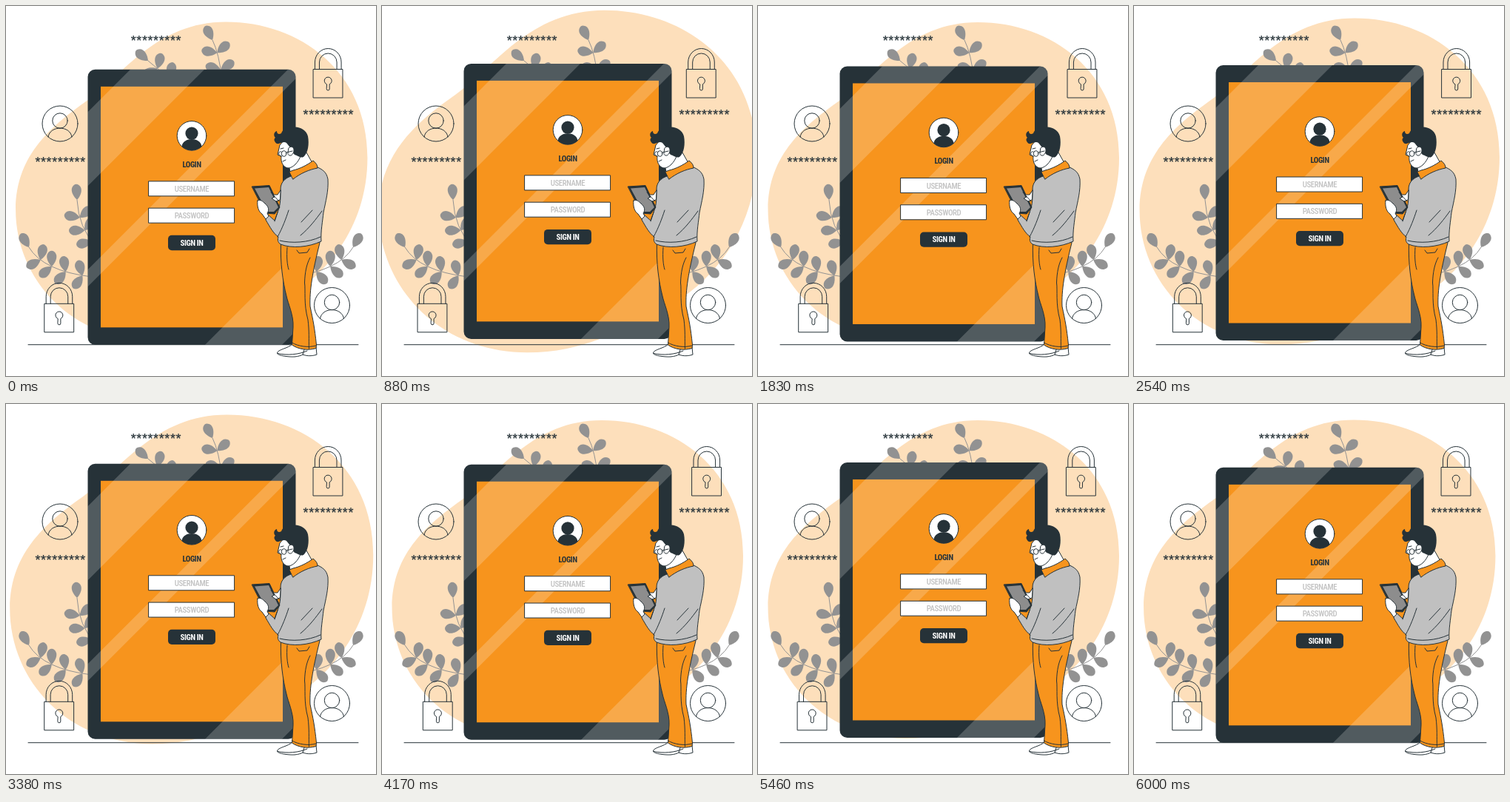
Recreate the animation shown at these times as an HTML page. Size 500 by 500 pixels, loop 6.04 s.

```html
<!DOCTYPE html>
<html lang="en">
<head>
<meta charset="utf-8">
<title>Sign in</title>
<style>
  html, body { margin: 0; width: 100%; height: 100%; overflow: hidden; background: #fff; }
  svg { display: block; width: 100%; height: 100%; }
  .line { fill: none; }
  .line, .ink { stroke: #263238; stroke-width: 1; stroke-linecap: round; stroke-linejoin: round; }
  .dark { fill: #263238; }
  .white { fill: #fff; }
  .orange { fill: #f7941d; }
  .grey { fill: #c0c0c0; }
  .plant path { fill: #929292; }
  .plant .stem { fill: none; stroke: #929292; stroke-width: 1; }
  .label { font: 500 10.8px "Roboto Condensed", Roboto, sans-serif; letter-spacing: -.4px; text-anchor: middle; }
  .strong { font-weight: 700; }
  .stars { font: 18px "Liberation Sans", Arial, sans-serif; letter-spacing: .6px; fill: #263238; stroke: #263238; stroke-width: .2; }
</style>
</head>
<body>
<svg viewBox="0 0 500 500" xmlns="http://www.w3.org/2000/svg">
  <defs>
    <clipPath id="shell"><rect x="110.5" y="86" width="281" height="372" rx="10"/></clipPath>
    <g id="lock" class="line">
      <rect x="415.5" y="85.5" width="39.5" height="38.5"/>
      <path d="M417.500 85.500V76a17.800 18.500 0 0 1 35.600 0V85.500M423.500 85.500V76a11.800 12 0 0 1 23.600 0V85.500"/>
      <path d="M433.2 105.7a5 5 0 1 1 4 0V112a2 2 0 0 1-4 0Z"/>
    </g>
    <g id="user" class="line">
      <circle r="24"/>
      <circle cy="-4" r="10.2"/>
      <path d="M-16 18C-14 2 14 2 16 18"/>
    </g>
    <g id="field"><rect class="ink white" x="193" y="237" width="115.6" height="20"/></g>
  </defs>

  <path id="blob" fill="#fddfbb" d="M297 22C397 22 488 89 488 205C488 300 430 368 370 398C318 424 270 452 200 452C90 452 13.5 370 13.5 275C13.5 200 65 160 110 128C158 94 203 22 297 22Z"/>
  <g id="plants" class="plant"></g>
  <g class="stars">
    <text x="168.7" y="53.4">*********</text>
    <text x="39.4" y="216.8">*********</text>
    <text x="401.6" y="153.4">*********</text>
  </g>
  <use href="#user" x="73" y="159"/>
  <use href="#user" x="440.5" y="404.5"/>
  <path class="line" d="M30 457.7H476"/>
  <use id="lockRight" href="#lock"/>
  <use id="lockLeft" href="#lock"/>

  <g id="device">
    <rect class="dark" x="110.5" y="86" width="281" height="372" rx="10"/>
    <rect class="orange" x="128" y="109" width="246" height="325.5"/>
    <g id="glare" clip-path="url(#shell)" fill="#fff" opacity=".2"></g>
    <circle class="ink white" cx="251" cy="175.5" r="19.8"/>
    <circle class="dark" cx="251" cy="172.2" r="8.6"/>
    <path class="dark" d="M237.5 190C239 177 263 177 264.5 190A19.8 19.8 0 0 1 237.5 190Z"/>
    <text class="label strong dark" x="251" y="218">LOGIN</text>
    <use href="#field"/>
    <use href="#field" y="36.3"/>
    <g class="label" fill="#c2c2c2">
      <text x="251" y="251.3">USERNAME</text>
      <text x="251" y="287.4">PASSWORD</text>
    </g>
    <rect class="dark" x="219" y="310" width="64" height="20.3" rx="5"/>
    <text class="label strong white" x="251" y="324">SIGN IN</text>
  </g>

  <g id="man">
    <path class="ink white" d="M387 457C381 463 367 464 366.5 469C366 472 380 474.5 390 474C400 473 405 470 409 463Z"/>
    <path class="ink white" d="M404 461L401 471C407 473.5 415 473 420 471L419 461Z"/>
    <path class="line" d="M367 469.5C380 472.5 396 471 407 466"/>
    <path class="ink orange" d="M371.5 320C370.5 348 374 372 379 392C381 402 389 418 388 434L386.5 458C395 464 408 466 419 462.5L419.5 458C417 434 415 425 411 406C410 385 414 360 424 320Z"/>
    <path class="line" d="M411 340C406 349 404 360 403.5 374C405 384 402 402 408 424C410 440 409 450 409.5 463M393 330L396 334L407 333L410 328M380 326C379 340 380 350 382 356M386.5 455C395 460 408 462 419 459"/>
    <path class="ink white" d="M380 205L384 224L392 232L415 214L406 198Z"/>
    <path class="ink grey" d="M385 230C376 233 371 239 371 248C370.5 259 372 266 367 279L363 290L353 281L351 289C357 299 361 307 368 312C367 316 367 319 371 322C386 328 409 326 426 318C425 305 428 290 429 279C432 264 436 250 435 234C433 224 428 221 419 217Z"/>
    <path class="ink orange" d="M383 224L388 222C397 220 407 215 415 209C419 212 421 215 421 219C410 221 398 226 388 234Z"/>
    <path class="line" d="M370 317C386 321 408 320 425 312M382 276C378 288 374 299 367 312M367 279L363 291M427 277C419 288 410 300 398 310M414 276L399 292"/>
    <path class="ink white" d="M376 181L370 188L367 201L372 203C371 210 374 218 381 219C388 219 395 211 398 203L404 183L392 176Z"/>
    <path class="dark" d="M366 186C363 184 361 180 364 178C361 175 362 170 366 169C366 173 369 174 372 172C374 166 381 162 389 163.5C398 163 406 168 408 176C410 187 408 198 403 203C399 207 394 202 390 201L386 196L383 190L379 185C375 182 370 187 366 186Z"/>
    <path class="ink white" d="M382 192C387 187 391 193 388 199C386 203 382 203 381 200Z"/>
    <ellipse class="line" cx="375.5" cy="199.5" rx="3.2" ry="3.8"/>
    <path class="line" d="M372 197C368 195 367 203 372 203M378.5 198L387 196M371 193L375 192M374 210L378 208"/>

    <path class="ink dark" d="M332.5 244L356 242.5L370 272L363 281L351 280Z"/>
    <path fill="#8d8d8d" d="M336 246.5L355 245L368 272L362 278L353 278Z"/>
    <path class="ink white" d="M340 263C344 261 347 264 350 267C355 271 356 276 353 280L355 284L351 288L346 281C341 278 339 270 340 263Z"/>
    <path class="ink white" d="M371 249L367 255L361 255L363 258L359 260L365 264L370 262Z"/>
    <path class="line" d="M358 252L369 264"/>
  </g>
</svg>
<script>
const $ = id => document.getElementById(id);
const LOOP = 6040, LEAD = 10;

function leaf(x, y, angle, length = 21) {
  const turn = angle * 180 / Math.PI;
  return `<path transform="translate(${x} ${y}) rotate(${turn}) scale(${length})"
    d="M0 0C.3 .3 .8 .48 1 .08Q1.03 0 1 -.08C.8 -.48 .3 -.3 0 0Z"/>`;
}

// A curved stem with one leaf on its tip and evenly spaced pairs below it.
function sprig(base, bend, tip, pairs) {
  const point = t => base.map((b, k) => (1 - t) ** 2 * b + 2 * t * (1 - t) * bend[k] + t * t * tip[k]);
  const heading = t => {
    const [dx, dy] = base.map((b, k) => (1 - t) * (bend[k] - b) + t * (tip[k] - bend[k]));
    return Math.atan2(dy, dx);
  };
  let shape = `<path class="stem" d="M${base}Q${bend} ${tip}"/>` + leaf(...tip, heading(1));
  for (let i = 0; i < pairs; i++) {
    const t = .8 * (1 - (i + .5) / pairs);
    for (const side of [-1, 1]) shape += leaf(...point(t), heading(t) + side * 1.13);
  }
  return shape;
}

const corner = sprig([116, 366], [50, 358], [31, 326], 4);
$("plants").innerHTML =
  sprig([292, 100], [288, 64], [279, 46], 2) +
  sprig([230, 104], [206, 86], [192, 74], 2) +
  sprig([122, 325], [98, 300], [96, 262], 3) +
  corner + `<g transform="translate(500 0) scale(-1 1)">${corner}</g>`;

// Diagonal bands: every edge is a line x + y = constant.
const band = (from, to) =>
  `<path d="M${from - 80} 80L${from - 470} 470H${to - 470}L${to - 80} 80Z"/>`;
$("glare").innerHTML = band(254, 354) + band(467, 490) + band(727, 831);

// Linear interpolation over evenly spaced values, p from 0 to 1.
function track(values, p) {
  const at = p * (values.length - 1), i = Math.floor(at);
  return values[i] + (values[i + 1] - values[i]) * (at - i);
}

const beat = [1, 1.1, 1.05, 1, 1, 1.1, 1, 1, 1, 1, 1];
const shake = [0, -1, 2, -4, 4, -4, 4, -4, 2, -1, 0];
const hover = [0, -10, 0];
const phase = (t, period) => t % period / period;
const move = (id, transform) => $(id).setAttribute("transform", transform);

function draw(t) {
  const dx = track(shake, phase(t, 3000));
  const scale = track(beat, phase(t, 6000));
  move("blob", `translate(250.5 237) scale(${scale}) translate(-250.5 -237)`);
  move("device", `translate(0 ${track(hover, phase(t, 1500))})`);
  move("lockRight", `translate(${dx} 0)`);
  move("lockLeft", `translate(${dx - 363.3} 316.8)`);
}

const start = performance.now();
function frame() {
  draw((performance.now() - start) % LOOP + LEAD);
  requestAnimationFrame(frame);
}
frame();
</script>
</body>
</html>
```
